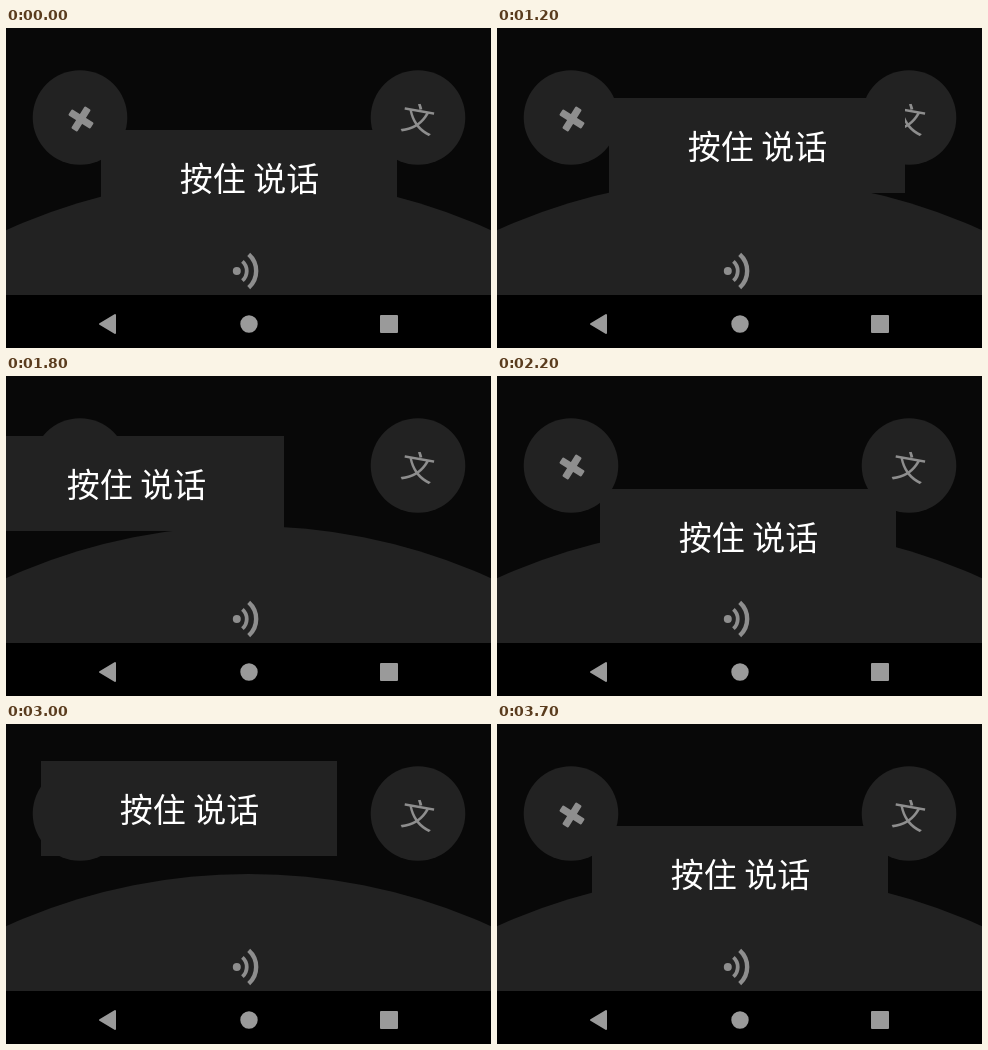
An HTML page that plays this animation: 485x320 px, repeating every 4400 ms.

```html
<!DOCTYPE html>
<html lang="zh-CN">
<head>
<meta charset="utf-8">
<title>Hold to talk</title>
<style>
  html, body {
    margin: 0;
    width: 100%;
    height: 100%;
    overflow: hidden;
    background: #080808;
  }
  svg { display: block; }
  text {
    font: 33px "Noto Sans CJK SC", "Noto Sans CJK", sans-serif;
    text-anchor: middle;
  }
  .panel { fill: #222; }
  .icon { fill: #8e8e8e; }
  .line { fill: none; stroke: #8e8e8e; }
  .nav { fill: #9a9a9a; stroke: #9a9a9a; stroke-width: 2; stroke-linejoin: round; }

  /* The drag moves in hard 100 ms steps, with pauses between strokes. */
  .bubble { animation: drag 4400ms step-end infinite; }
  @keyframes drag {
    0% { transform: translate(95px, 102px); }

    18.18% { transform: translate(55px, 109px); }
    20.45% { transform: translate(48px, 113px); }

    25% { transform: translate(80px, 92px); }
    27.27% { transform: translate(112px, 70px); }
    29.54% { transform: translate(134px, 56px); }

    34.09% { transform: translate(23px, 27px); }
    36.36% { transform: translate(-18px, 12px); }
    38.63% { transform: translate(-24px, 24px); }
    40.9% { transform: translate(-18px, 60px); }
    43.18% { transform: translate(-5px, 108px); }
    45.45% { transform: translate(8px, 147px); }

    50% { transform: translate(103px, 113px); }
    52.27% { transform: translate(172px, 78px); }
    54.54% { transform: translate(208px, 56px); }

    59.09% { transform: translate(205px, 50px); }
    61.36% { transform: translate(182px, 45px); }
    63.63% { transform: translate(136px, 41px); }
    65.9% { transform: translate(82px, 38px); }
    68.18% { transform: translate(35px, 37px); }
    70.45% { transform: translate(92px, 116px); }
    72.72% { transform: translate(107px, 133px); }

    79.54% { transform: translate(168px, 80px); }
    81.81% { transform: translate(206px, 47px); }
    84.09%, 100% { transform: translate(95px, 102px); }
  }
</style>
</head>
<body>
<svg width="485" height="320" viewBox="0 0 485 320">
  <rect width="485" height="320" fill="#080808"/>
  <circle class="panel" cx="242.5" cy="739" r="589"/>

  <!-- cancel -->
  <circle class="panel" cx="74" cy="89.5" r="47.3"/>
  <g class="icon" transform="translate(75 91) rotate(32)">
    <rect x="-13" y="-3.6" width="26" height="7.2" rx="1.3"/>
    <rect x="-3.6" y="-13" width="7.2" height="26" rx="1.3"/>
  </g>

  <!-- convert to text -->
  <circle class="panel" cx="412" cy="89.5" r="47.3"/>
  <text class="icon" transform="translate(412 91) rotate(10)" y="12.5">文</text>

  <!-- sound waves -->
  <g transform="translate(228 243)">
    <circle class="icon" cx="2.8" r="4"/>
    <path class="line" stroke-width="3.8" d="M8.4-9.6A12.8 12.8 0 0 1 8.4 9.6"/>
    <path class="line" stroke-width="4.4" d="M14.7-16.6A22.2 22.2 0 0 1 14.7 16.6"/>
  </g>

  <g class="bubble">
    <rect class="panel" width="296" height="95"/>
    <text x="148.5" y="61" fill="#fff">按住 说话</text>
  </g>

  <!-- system bar -->
  <rect y="267" width="485" height="53"/>
  <g class="nav">
    <path d="M94 296L109 287V305Z"/>
    <circle cx="243" cy="296" r="7.7"/>
    <rect x="375" y="288" width="16" height="16"/>
  </g>
</svg>
</body>
</html>
```
